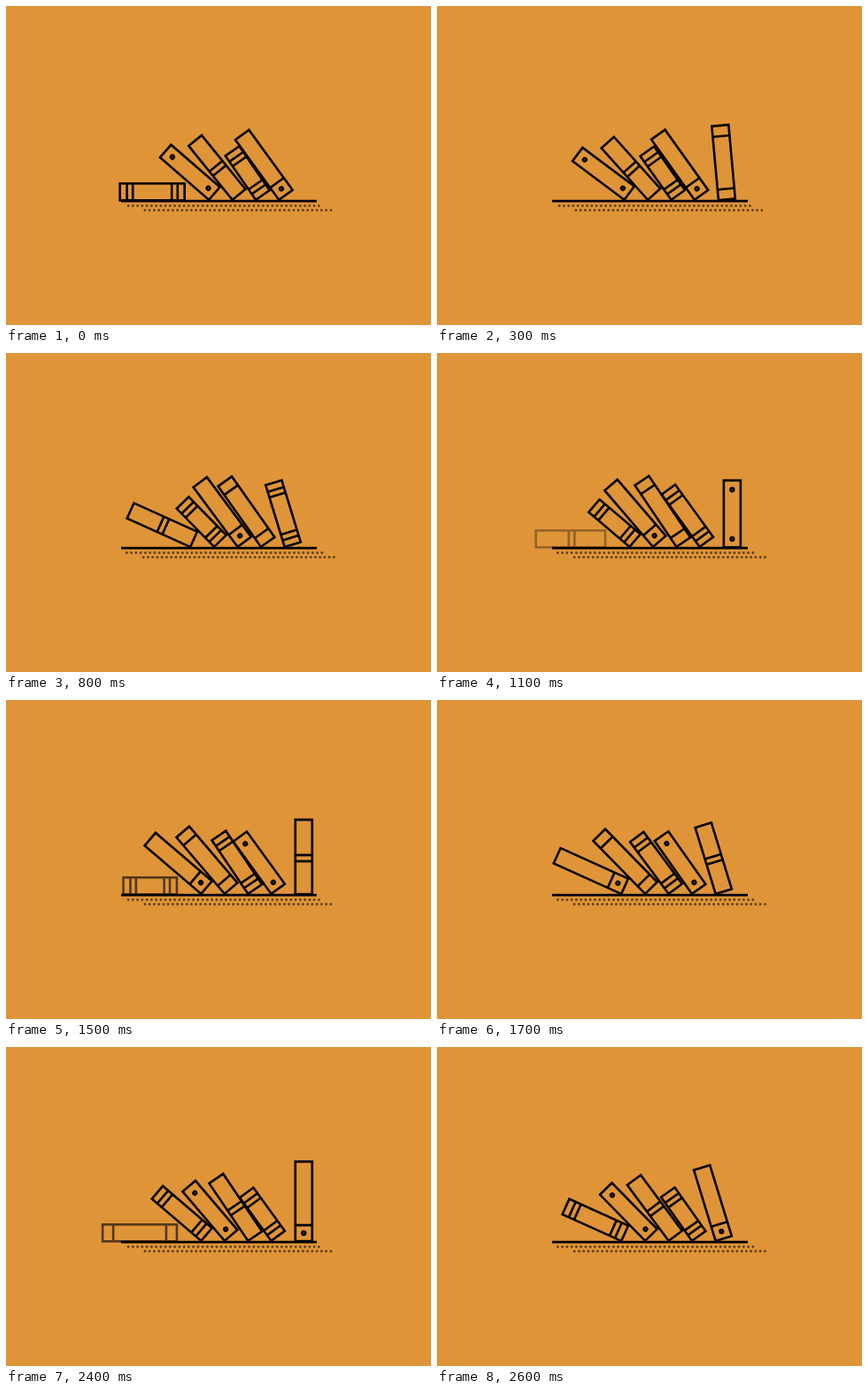
Animation, 480 px wide and 360 px high, one loop 2700 ms. Source, as an HTML page:

```html
<!DOCTYPE html>
<html lang="en">
<head>
<meta charset="utf-8">
<title>Bookshelf loader</title>
<style>
  html, body { margin: 0; height: 100%; overflow: hidden; background: #df9438; }
  svg { display: block; width: 480px; height: 360px; }
  .book { fill: #df9438; stroke: #000; stroke-width: 2.6; }
  .dots { fill: none; stroke: #000; stroke-opacity: .56; stroke-width: 2.9; stroke-linecap: round; stroke-dasharray: 0 5.25; }
</style>
</head>
<body>
<svg viewBox="0 0 480 360">
  <g id="books"></g>
  <path d="M130 220.1H351" stroke="#000" stroke-width="2.6"/>
  <path class="dots" d="M135.5 225.5H358.3"/>
  <path class="dots" d="M154.3 230.5H371"/>
</svg>
<script>
const LOOP = 2700, DOT_LOOP = 300, WIDTH = 21.6, BASE = 220.6;

// lines and rings are distances from the top of the cover
const books = [
  { height: 86.4, lines: [13.3, 73.1] },
  { height: 75.6, lines: [9.2, 15.8, 59.8, 66.4] },
  { height: 75.6, rings: [11.4, 65.2] },
  { height: 81, lines: [38.5, 45] },
  { height: 63, lines: [9.2, 15.6, 47.4, 53.8] },
  { height: 86.4, lines: [68.2], rings: [76.6] },
];

// keyframes: [progress, value]
const tilt = [[.099, 0], [.155, 36], [.25, 36], [.36, 34], [.42, 34], [.51, 40],
              [.6, 41], [.66, 49], [.769, 50], [.828, 90]];
const stretch = [[0, 1], [.048, 1.08], [.086, 1]];
const fade = [[.01, 0], [.045, 1], [.86, 1], [.925, 0]];

function sample(keys, p) {
  if (p <= keys[0][0]) return keys[0][1];
  for (let i = 1; i < keys.length; i++) {
    const [p0, v0] = keys[i - 1], [p1, v1] = keys[i];
    if (p < p1) return v0 + (v1 - v0) * (p - p0) / (p1 - p0);
  }
  return keys[keys.length - 1][1];
}

function bookMarkup({ height, lines = [], rings = [] }) {
  const cover = `<rect x="1.3" y="${1.3 - height}" width="${WIDTH - 2.6}" height="${height - 2.6}"/>`;
  const bands = lines.map(y => `<path d="M1.3 ${y - height}h${WIDTH - 2.6}"/>`);
  const circles = rings.map(y => `<circle cx="${WIDTH / 2}" cy="${y - height}" r="1.8"/>`);
  return `<g class="book">${cover}${bands.join('')}${circles.join('')}</g>`;
}

document.getElementById('books').innerHTML = books.map(bookMarkup).join('');
const bookNodes = document.querySelectorAll('.book');
const dotRows = document.querySelectorAll('.dots');

function draw(time) {
  bookNodes.forEach((node, i) => {
    const p = ((time + 438 - LOOP * (i + 1) / 6) / LOOP + 1) % 1;
    const x = 333.6 - 157.5 * p;
    node.setAttribute('transform',
      `translate(${x} ${BASE}) rotate(${-sample(tilt, p)}) scale(1 ${sample(stretch, p)})`);
    node.setAttribute('opacity', sample(fade, p));
  });
  const shift = 2.6 + 5.25 * (time % DOT_LOOP) / DOT_LOOP;
  dotRows.forEach(row => row.setAttribute('stroke-dashoffset', -shift));
}

function tick() {
  draw(performance.now() % LOOP);
  requestAnimationFrame(tick);
}
tick();
</script>
</body>
</html>
```
